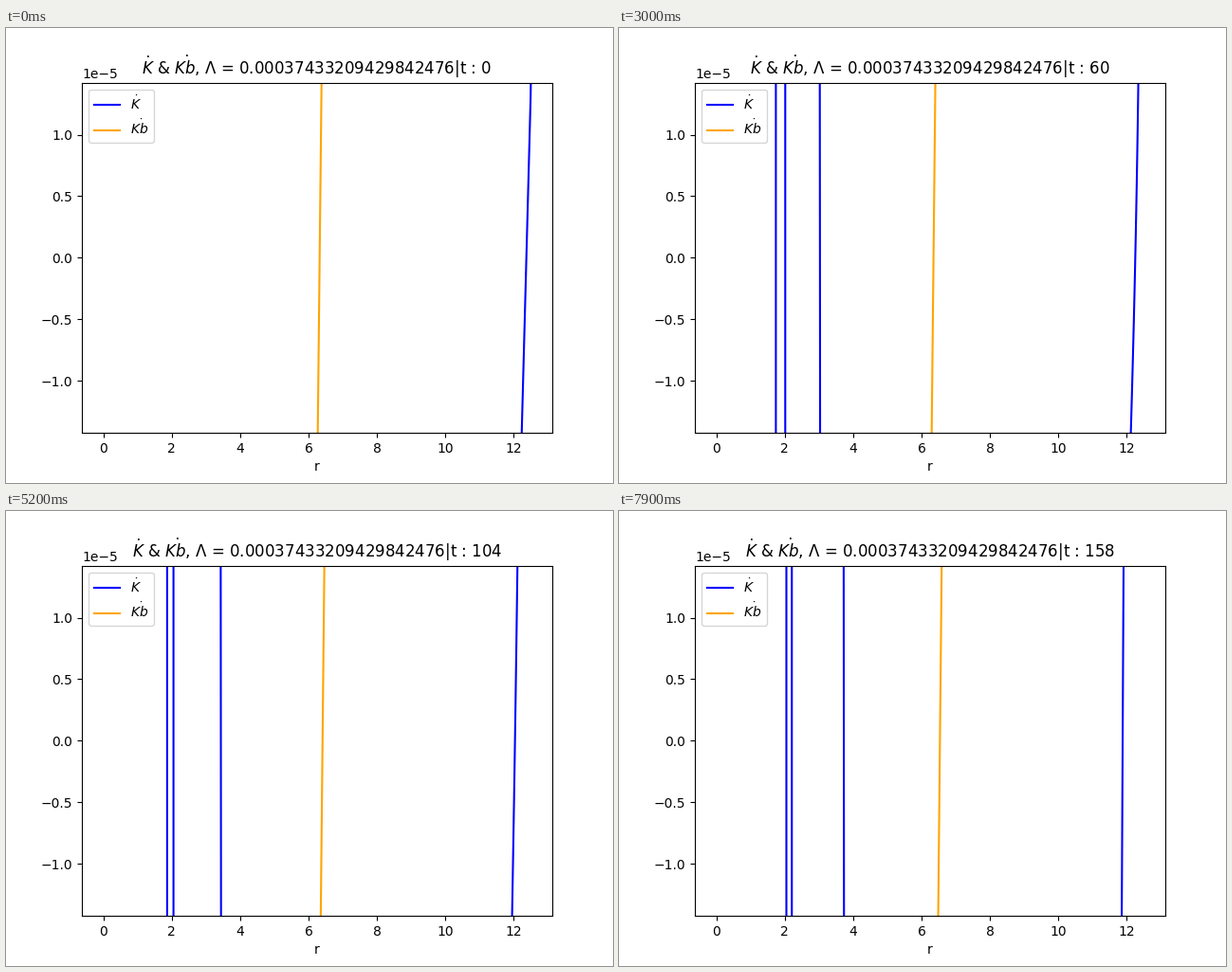
A matplotlib script that plays this animation: 640 by 480 pixels, repeating every 8 s.

```python
import numpy as np
import matplotlib.pyplot as plt
from matplotlib.animation import FuncAnimation

FRAMES, INTERVAL = 80, 100
R_MAX, Y_MAX = 12.5, 1.4233e-5
TITLE = r"$\dot{K}$ & $\dot{Kb}$, $\Lambda$ = 0.00037433209429842476|t : %d"
LEGEND_FLOOR = 0.656  # bottom of the legend as a fraction of Y_MAX
SPLIT_T, SPLIT_X = 1.7, 188.8

fig, ax = plt.subplots(figsize=(6.4, 4.8), dpi=100)
ax.set_xlim(-0.05 * R_MAX, 1.05 * R_MAX)
ax.set_ylim(-Y_MAX, Y_MAX)
ax.set_xlabel("r")
k_line, = ax.plot([], [], color="blue", label=r"$\dot{K}$")
kb_line, = ax.plot([], [], color="orange", label=r"$\dot{Kb}$")
legend = ax.legend(loc="upper left")

# Curves are laid out as (x in pixels, y as a fraction of Y_MAX)
LEFT = 80 + 496 * 0.05 / 1.1
RIGHT = 80 + 496 * 1.05 / 1.1


def set_curve(line, points):
    x, v = np.array(points).T
    line.set_data((x - LEFT) / (RIGHT - LEFT) * R_MAX, v * Y_MAX)


def inner(t):
    """Innermost zero crossing: quick start, then a slow drift."""
    return 161.08 + 1.2 * t + 0.095 * t ** 2 - 19 * np.exp(-1.64 * t)


def split(t, a, b, c):
    """Crossing that leaves the split point like a square root."""
    s = t - SPLIT_T
    return SPLIT_X + a * np.sqrt(s) + b * s + c * s ** 2


def spike(t):
    """Heights of the boundary spike and of the curve's end."""
    return 0.47 + (t - 0.75) ** 2, -0.1 + 1.13 * (t - 1) ** 2


def outer(t):
    """Outer branch, drifting left and steepening."""
    mid = 529.8 + 19.5 / (1 + np.exp((t - 4.4) / 1.3))
    half = 4.9 - 0.2 * t - 0.038 * t ** 2
    bend = 0.8 * np.exp(-((t - 3.4) / 1.6) ** 2)
    peak, end = spike(t)
    v = np.linspace(-1.3, min(peak, 1.3), 20)
    x = np.minimum(mid + half * v - bend * v ** 2, RIGHT)
    return [*zip(x, v), (x[-1], peak), (RIGHT, end)]


def draw(i):
    t = i * INTERVAL / 1000
    pts = [(LEFT, -3)]
    if i > 0:
        x = inner(t)
        pts = [(LEFT, 3), (x, 3), (x, -3)]
    if t > SPLIT_T:
        a = split(t, -21, 8.2, -0.133)
        b = split(t, 19.3, 1.03, -0.161)
        pts += [(a, -3), (a, 3), (b - 0.5, 3), (b + 0.5, -3)]
    set_curve(k_line, pts + outer(t))

    c = 330.7 + 0.0815 * t ** 2.2
    tilt = 2.0 - 0.02 * t
    set_curve(kb_line, [(c - 2 * tilt, -2), (c + 2 * tilt, 2)])

    # The legend prefers the right corner while the spike stays below it
    low = spike(t)[0] < LEGEND_FLOOR
    legend.set_loc("upper right" if low else "upper left")
    ax.set_title(TITLE % (2 * i))
    return k_line, kb_line


anim = FuncAnimation(fig, draw, frames=FRAMES, interval=INTERVAL,
                     repeat=True, repeat_delay=0, blit=False)
plt.show()
```
